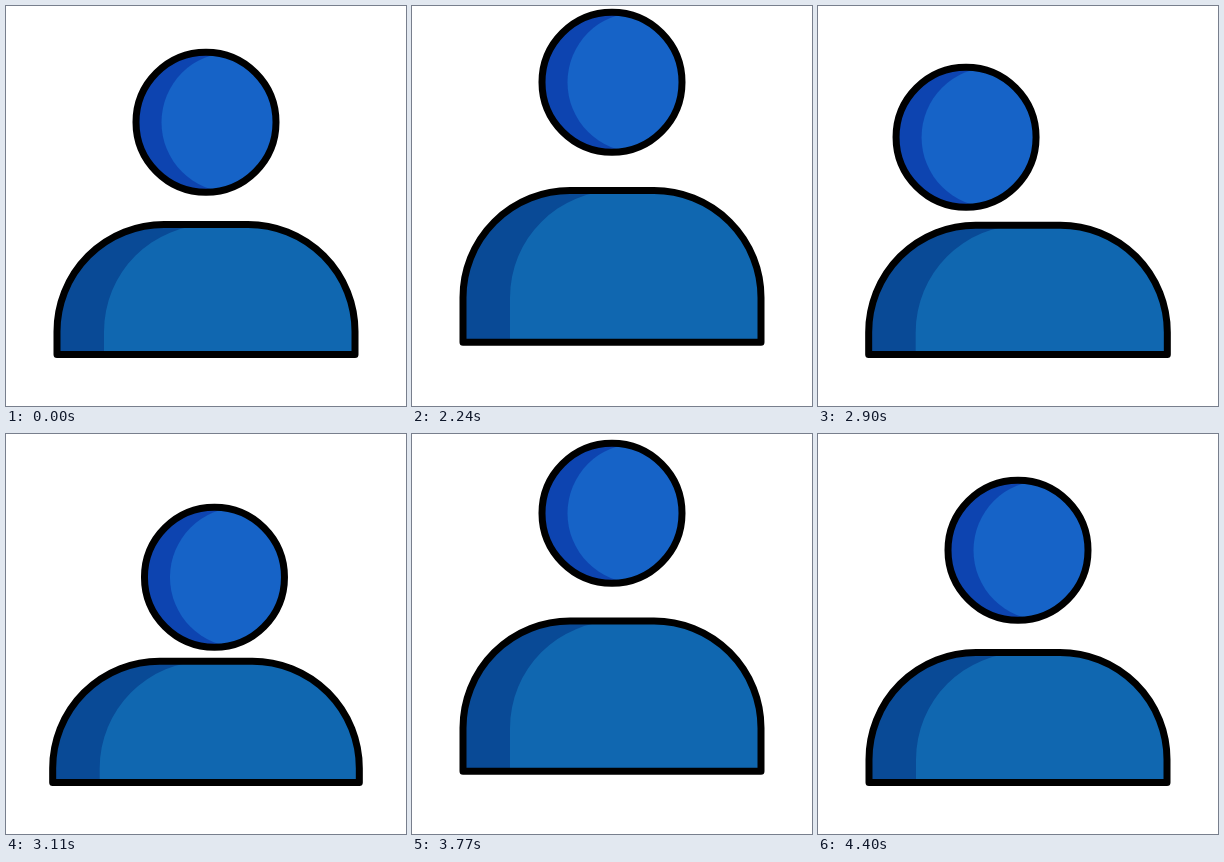
Write an HTML page that moves like this. It is 400 px wide and 400 px high and loops after 4430 ms.

```html
<!DOCTYPE html>
<html lang="en">
<head>
<meta charset="utf-8">
<title>Hopping avatar</title>
<style>
  html, body { margin: 0; width: 100%; height: 100%; overflow: hidden; background: #fff; }
  svg { display: block; width: 100%; height: 100%; }
  .line { fill: none; stroke: #000; stroke-width: 7; stroke-linejoin: round; }
</style>
</head>
<body>
<svg viewBox="0 0 400 400">
  <defs><clipPath id="face"><circle r="70"/></clipPath></defs>
  <path id="shade" fill="#094a96"/>
  <path id="light" fill="#1067b0"/>
  <path id="outline" class="line"/>
  <g id="head">
    <circle r="70" fill="#0d44b0"/>
    <g clip-path="url(#face)"><circle cx="25.5" r="70" fill="#1663c7"/></g>
    <circle r="70" class="line"/>
  </g>
</svg>
<script>
const LOOP = 4430, START = 2030, STEP = 30, RADIUS = 107;
const $ = id => document.getElementById(id);

// Smooth rise from 0 to 1 between two times.
function ease(t, from, to) {
  const u = Math.min(1, Math.max(0, (t - from) / (to - from)));
  return u * u * (3 - 2 * u);
}

// Rise to 1 at the peak, then back to 0.
const swell = (t, from, peak, to) => ease(t, from, peak) - ease(t, peak, to);

function torso(left, right, top, bottom) {
  const r = RADIUS;
  return `M${left} ${bottom}V${top + r}A${r} ${r} 0 0 1 ${left + r} ${top}` +
         `H${right - r}A${r} ${r} 0 0 1 ${right} ${top + r}V${bottom}Z`;
}

function drawHead(t, roll) {
  const toLeft = ease(t, 2240, 2540), toRight = ease(t, 2870, 3260);
  const home = ease(t, 3505, 3770);
  const x = 200 - 53.5 * toLeft + 92.5 * toRight - 39 * home;
  const hop = 40 * swell(t, 1990, 2240, 2540) + 37 * swell(t, 3505, 3770, 4235);
  const y = 116.3 + 14 * (toLeft - home) + 15 * roll - hop;
  $("head").setAttribute("transform", `translate(${x} ${y})`);
}

function drawBody(t, roll) {
  const lift = 34 * swell(t, 2000, 2245, 2480) + 32 * swell(t, 3520, 3790, 4320);
  const landing = 4 * swell(t, 2400, 2510, 2660) + 1.5 * swell(t, 4230, 4320, 4400);
  const top = 218.5 - lift + landing + 10 * roll;
  const bottom = 348.5 - 0.36 * lift;
  const left = 51 - 5 * roll, right = 349 + 5 * roll;
  const shape = torso(left, right, top, bottom);
  $("shade").setAttribute("d", shape);
  $("outline").setAttribute("d", shape);
  $("light").setAttribute("d", torso(left + 47, right, top, bottom));
}

function tick() {
  const now = performance.now() % LOOP;
  const t = now < START ? 0 : now - (now - START) % STEP;
  const roll = swell(t, 2870, 3065, 3260);
  drawHead(t, roll);
  drawBody(t, roll);
  requestAnimationFrame(tick);
}
tick();
</script>
</body>
</html>
```
